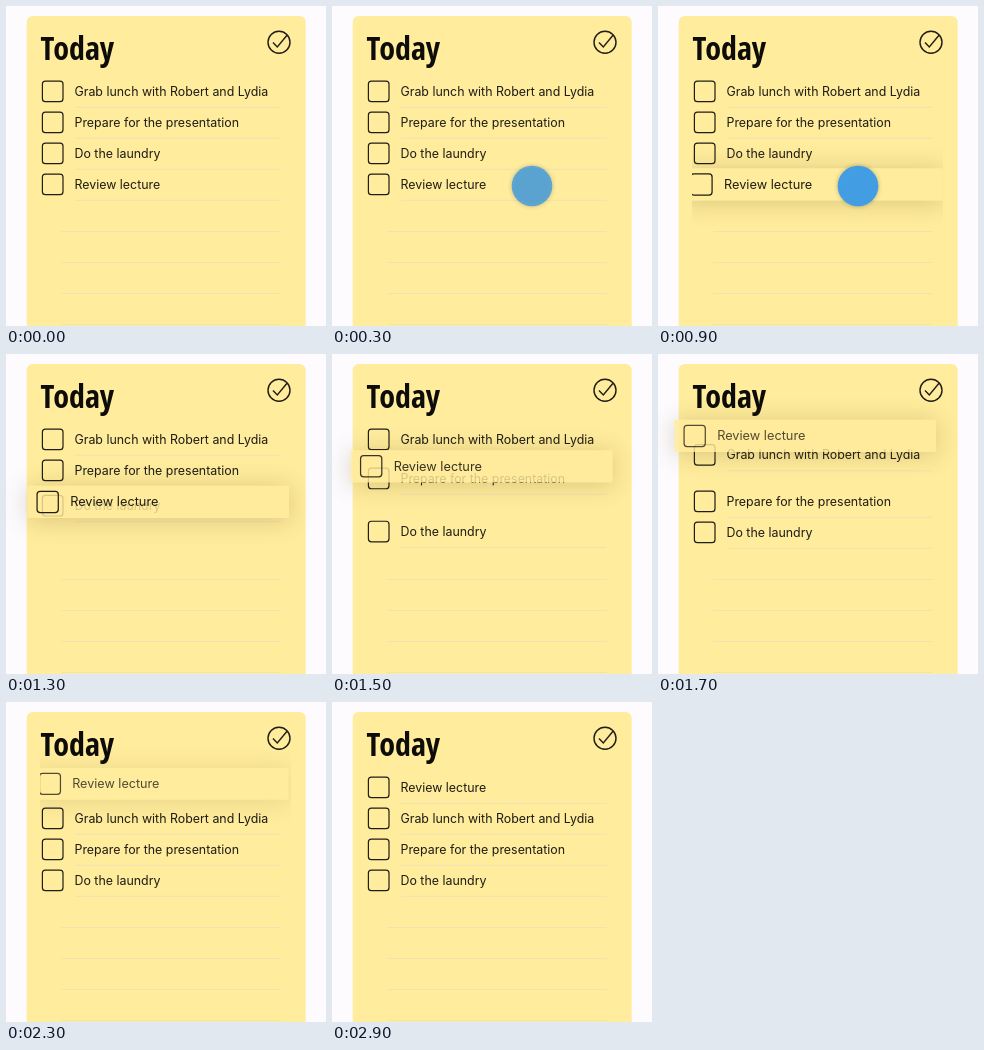
Recreate the animation shown at these times as an HTML page with a canvas. Size 320x320 px, loop 3 s.

```html
<!DOCTYPE html>
<html lang="en">
<head>
<meta charset="utf-8">
<title>Reordering a to-do list</title>
<style>
  html, body { margin: 0; width: 100%; height: 100%; overflow: hidden; background: #fdfbfe; }
  canvas { display: block; width: 320px; height: 320px; }
</style>
</head>
<body>
<canvas id="stage"></canvas>
<script>
const LOOP = 3000, STEP = 100;
const TOP = 85, PITCH = 31, TEXT_X = 68.5, PIVOT_X = 154;
const PAPER = '#ffec9c', INK = '#1f1d14', RULE = '#f2e1b2', BLUE = '#429de2';
const TITLE_FONT = 'bold condensed 32px "Open Sans Condensed", "Noto Sans Condensed", ' +
  '"Roboto Condensed", "Liberation Sans Narrow", "Open Sans", sans-serif';

const canvas = document.getElementById('stage');
const ctx = canvas.getContext('2d');
const ratio = window.devicePixelRatio || 1;
canvas.width = canvas.height = 320 * ratio;

const clamp = v => Math.max(0, Math.min(1, v));
const progress = (t, a, b) => clamp((t - a) / (b - a));
const smooth = p => p * p * (3 - 2 * p);
const ease = (t, a, b) => smooth(progress(t, a, b));

// Linear interpolation through [time, value] pairs.
function track(t, keys) {
  if (t <= keys[0][0]) return keys[0][1];
  for (let i = 1; i < keys.length; i++) {
    const [t0, v0] = keys[i - 1], [t1, v1] = keys[i];
    if (t <= t1) return v0 + (v1 - v0) * (t - t0) / (t1 - t0);
  }
  return keys[keys.length - 1][1];
}

// Each row slides one place down as the dragged row passes it.
const rows = [
  { label: 'Grab lunch with Robert and Lydia', start: 1550 },
  { label: 'Prepare for the presentation', start: 1400 },
  { label: 'Do the laundry', start: 1230 }
];
const SLIDE = 300;

const dragX = [[1100, 0], [1300, -1.8], [1700, -6.8], [2000, -6.8], [2300, -0.8], [2600, 0]];
const dragY = [[1100, 178], [1200, 165], [1300, 147.5], [1600, 94], [1700, 81.5], [2300, 81.5], [2600, 85]];
const dragInk = [[1300, 1], [1700, 0.78], [2300, 0.78], [2600, 1]];
const touchAlpha = [[100, 0], [350, 1], [1000, 1], [1200, 0]];
const liftAmount = [[600, 0], [900, 1], [2100, 1], [2600, 0]];

function rule(y, x = 69) {
  ctx.fillStyle = RULE;
  ctx.fillRect(x, y - 0.5, 274.5 - x, 1);
}

function rowContent(label, y) {
  ctx.strokeStyle = INK;
  ctx.lineWidth = 1.2;
  ctx.beginPath();
  ctx.roundRect(36.4, y - 9.9, 20.6, 20.6, 3);
  ctx.stroke();
  ctx.fillStyle = INK;
  ctx.font = '12.4px Inter, sans-serif';
  ctx.fillText(label, TEXT_X, y + 4.6);
}

function paper() {
  ctx.fillStyle = '#fdfbfe';
  ctx.fillRect(0, 0, 320, 320);
  ctx.fillStyle = PAPER;
  ctx.beginPath();
  ctx.roundRect(20.7, 10, 279, 330, 6);
  ctx.fill();

  ctx.fillStyle = '#0d0c08';
  ctx.font = TITLE_FONT;
  ctx.fillText('Today', 34.5, 54);

  ctx.strokeStyle = INK;
  ctx.lineWidth = 1.4;
  ctx.beginPath();
  ctx.arc(273, 36.2, 11, 0, 2 * Math.PI);
  ctx.moveTo(267, 36.5);
  ctx.lineTo(271.3, 41);
  ctx.lineTo(281, 29.3);
  ctx.stroke();

  for (let i = 0; i < 4; i++) rule(225.5 + i * PITCH, 55.5);
}

function panel(x, y, w, h, lift, opacity) {
  ctx.save();
  ctx.globalAlpha = opacity;
  ctx.fillStyle = PAPER;
  ctx.fillRect(x, y, w, h);
  ctx.restore();

  // The shadow falls only outside the translucent panel.
  ctx.save();
  ctx.beginPath();
  ctx.rect(-50, -50, 420, 420);
  ctx.rect(x, y, w, h);
  ctx.clip('evenodd');
  ctx.shadowColor = `rgba(95, 75, 20, ${0.24 * lift})`;
  ctx.shadowBlur = 24 * ratio;
  ctx.shadowOffsetY = 2 * ratio;
  ctx.fillStyle = PAPER;
  ctx.fillRect(x, y, w, h);
  ctx.restore();
}

function draggedRow(t) {
  const y = track(t, dragY), lift = track(t, liftAmount);
  const floating = t >= 1100 && t <= 2100;
  if (lift === 0) rule(y + 16.3);
  ctx.save();
  if (!floating) {
    ctx.beginPath();
    ctx.rect(34, 0, 251, 320);
    ctx.clip();
  }
  const scale = 1 + 0.03 * lift;
  ctx.translate(PIVOT_X + track(t, dragX), y);
  ctx.scale(scale, scale);
  ctx.translate(-PIVOT_X, 0);
  if (lift > 0) panel(27, -15.2, 254, 31.2, lift, floating ? 0.82 : 1);
  ctx.globalAlpha = track(t, dragInk);
  rowContent('Review lecture', 0);
  ctx.restore();
}

function touch(alpha) {
  if (!alpha) return;
  ctx.save();
  ctx.globalAlpha = alpha;
  ctx.shadowColor = 'rgba(60, 80, 90, 0.4)';
  ctx.shadowBlur = 4 * ratio;
  ctx.fillStyle = BLUE;
  ctx.beginPath();
  ctx.arc(200, 180, 20.3, 0, 2 * Math.PI);
  ctx.fill();
  ctx.restore();
}

function draw(t) {
  ctx.setTransform(ratio, 0, 0, ratio, 0, 0);
  paper();
  rows.forEach(({ label, start }, i) => {
    const y = TOP + PITCH * (i + ease(t, start, start + SLIDE));
    rule(y + 16.3);
    rowContent(label, y);
  });
  draggedRow(t);
  touch(track(t, touchAlpha));
}

const begin = performance.now();
function frame() {
  const t = (performance.now() - begin) % LOOP;
  draw(Math.floor(t / STEP) * STEP);
  requestAnimationFrame(frame);
}
frame();
</script>
</body>
</html>
```
